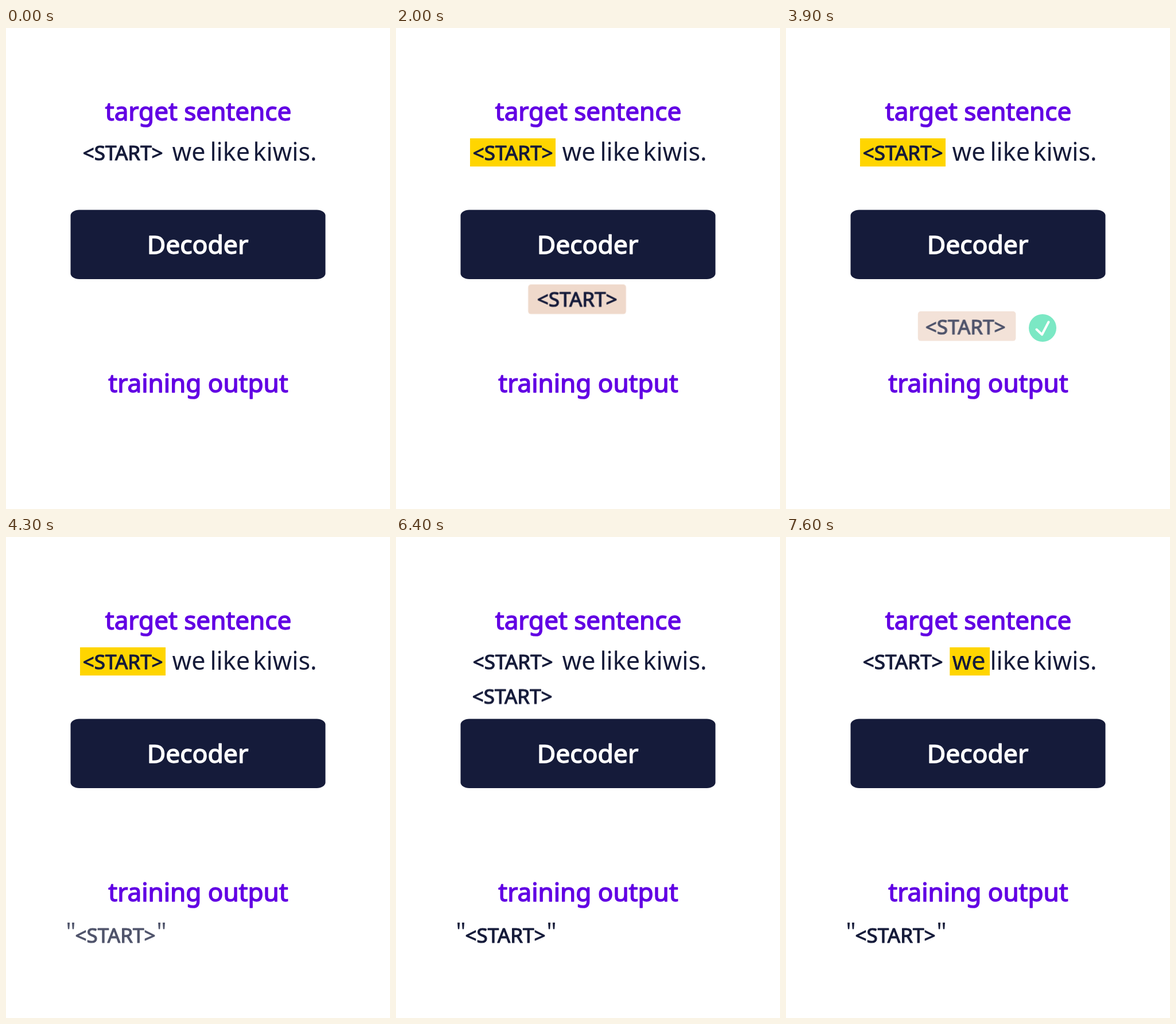
An HTML page for the animation above (8000 ms loop, 669x837 px).

```html
<!DOCTYPE html>
<html lang="en">
<head>
<meta charset="utf-8">
<title>Decoder training</title>
<style>
  html, body { margin: 0; width: 100%; height: 100%; overflow: hidden; background: #fff; }
  svg { display: block; width: 100%; height: 100%; }
  text { font-family: "Noto Sans", "Open Sans", sans-serif; fill: #151b3a; }
  /* A thin outline gives a weight between regular and bold. */
  .head, .label, .token { text-anchor: middle; stroke-width: .034em; stroke-linejoin: round; }
  .head { font-size: 44px; fill: #6200e4; stroke: #6200e4; }
  .label { font-size: 44.5px; fill: #fff; stroke: #fff; }
  .token { font-size: 35px; stroke: #151b3a; }
  .word { font-size: 43px; }
  .quote { font-size: 43px; text-anchor: middle; }
  .mark { fill: #ffd500; }

  /* Tiny negative delay keeps stepped changes clear of rounding. */
  .anim { animation: 8s linear -1ms infinite both; }
  .mark-start { animation-name: mark-start; }
  .mark-we { animation-name: mark-we; }
  .result { animation-name: result; }
  .chip { animation-name: chip; }
  .chip-token { animation-name: chip-token; }
  .check { animation-name: check; }
  .output { animation-name: output; }
  .feed { animation-name: feed; }
  .feed-we { animation-name: feed-we; }

  @keyframes mark-start {
    0% { opacity: 0; }
    10% { opacity: 0; animation-timing-function: steps(2); }
    12.5% { opacity: 1; }
    61.25% { opacity: 1; animation-timing-function: steps(2); }
    63.75%, 100% { opacity: 0; }
  }
  @keyframes mark-we {
    0% { opacity: 0; }
    92.5% { opacity: 0; animation-timing-function: steps(2); }
    95%, 100% { opacity: 1; }
  }
  @keyframes chip {
    0% { transform: translate(1px, -122px); }
    20% { transform: translate(1px, -122px); animation-timing-function: cubic-bezier(.37, 0, .63, 1); }
    28.75%, 100% { transform: none; }
  }
  @keyframes chip-token {
    0% { transform: translate(7.7px, -126px); }
    20% { transform: translate(7.7px, -126px); animation-timing-function: cubic-bezier(.37, 0, .63, 1); }
    28.75%, 100% { transform: none; }
  }
  @keyframes check {
    0% { opacity: 0; }
    28.75% { opacity: 0; animation-timing-function: steps(3); }
    32.5%, 100% { opacity: 1; }
  }
  @keyframes result {
    0% { opacity: 1; }
    47.5% { opacity: 1; animation-timing-function: steps(4); }
    52.5%, 100% { opacity: 0; }
  }
  @keyframes output {
    0% { opacity: 0; }
    50% { opacity: 0; animation-timing-function: steps(4); }
    55%, 100% { opacity: 1; }
  }
  @keyframes feed {
    0% { opacity: 0; transform: none; animation-timing-function: step-end; }
    75% { opacity: 1; transform: none; }
    76.25% { opacity: 1; transform: none; animation-timing-function: cubic-bezier(.37, 0, .63, 1); }
    83.75%, 100% { opacity: 1; transform: translate(-2px, 119px); }
  }
  @keyframes feed-we {
    0% { opacity: 0; animation-timing-function: step-end; }
    90%, 100% { opacity: 1; }
  }
</style>
</head>
<body>
<svg viewBox="0 0 669 837">
  <text class="head" x="335" y="161">target sentence</text>

  <rect class="mark anim mark-start" x="129" y="192" width="149" height="49"/>
  <rect class="mark anim mark-we" x="285.3" y="192" width="69.7" height="49"/>
  <text class="token" x="203.7" y="230">&lt;START&gt;</text>
  <text class="word" x="289.5" y="231">we</text>
  <text class="word" x="355.5" y="231">like</text>
  <text class="word" x="430.5" y="231">kiwis.</text>

  <!-- Parts that pass behind the decoder -->
  <text class="token anim feed" x="203.7" y="230">&lt;START&gt;</text>
  <text class="word anim feed-we" x="289.5" y="231">we</text>
  <g class="anim result">
    <rect class="anim chip" x="229.8" y="493" width="170.6" height="51.6" rx="5" fill="#efd9cb"/>
    <text class="token anim chip-token" x="312.7" y="533">&lt;START&gt;</text>
    <g class="anim check">
      <circle cx="447" cy="522" r="24" fill="#4fe0b0"/>
      <path d="M436.5 524.5L446 533.5L457.5 511.5" fill="none" stroke="#fff" stroke-width="4" stroke-linecap="round" stroke-linejoin="round"/>
    </g>
  </g>

  <rect x="112.5" y="316.6" width="444" height="120.4" rx="15" ry="10" fill="#151b3a"/>
  <text class="label" x="334" y="393">Decoder</text>

  <text class="head" x="335" y="634">training output</text>
  <g class="anim output">
    <text class="quote" x="113" y="702">"</text>
    <text class="token" x="190.5" y="705.5">&lt;START&gt;</text>
    <text class="quote" x="271" y="702">"</text>
  </g>
</svg>
</body>
</html>
```
